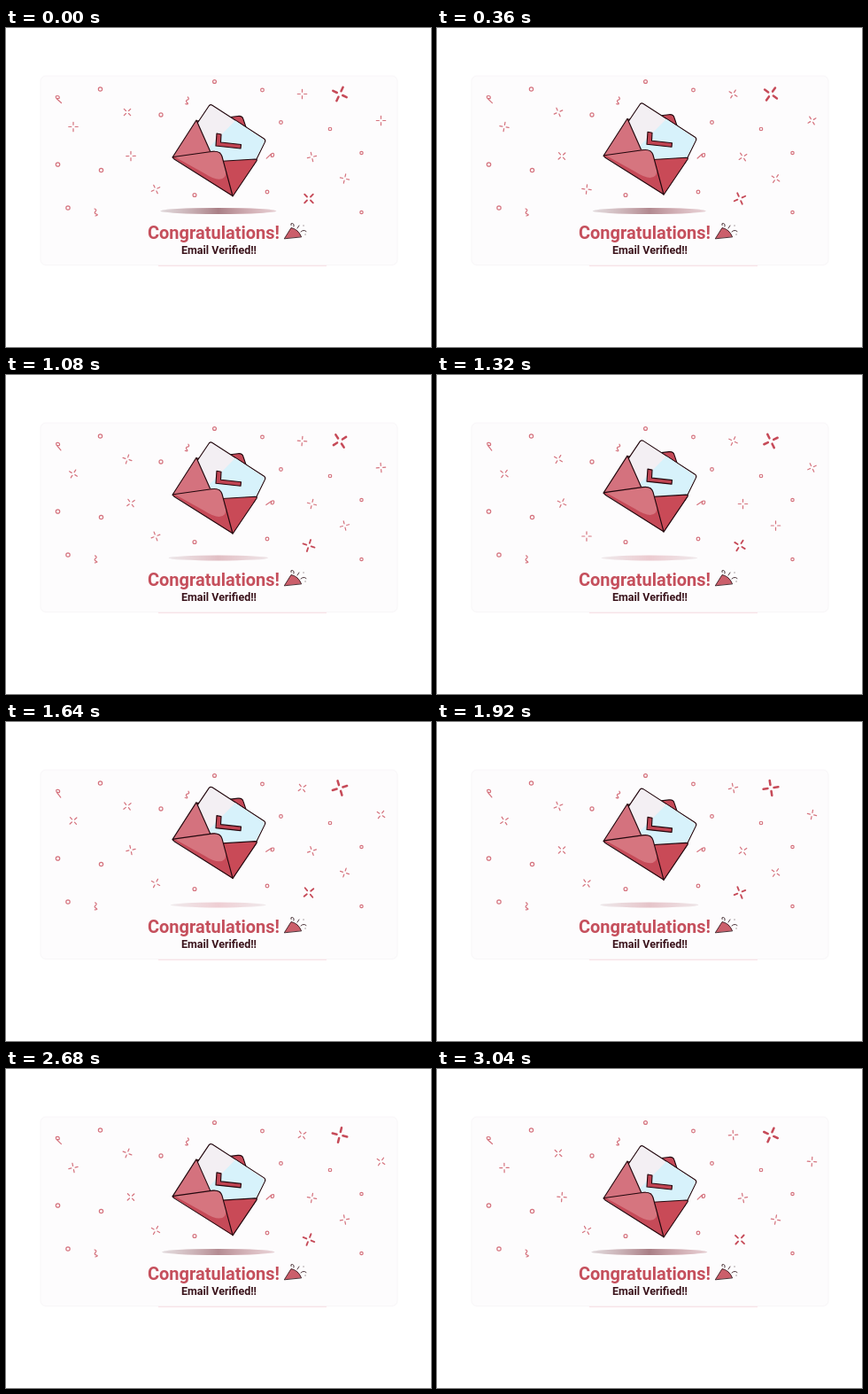
Write an HTML page that moves like this. It is 480 px wide and 360 px high and loops after 3080 ms.

```html
<!DOCTYPE html>
<html lang="en">
<head>
<meta charset="utf-8">
<title>Email verified</title>
<style>
  html, body { margin: 0; width: 100%; height: 100%; overflow: hidden; background: #fff; }
  svg { display: block; width: 480px; height: 360px; }
  text { font-family: Roboto, Arial, sans-serif; font-weight: 700; text-anchor: middle; }
  .ink { stroke: #23080e; stroke-width: 1.15; stroke-linejoin: round; stroke-linecap: round; }
  .thin { stroke-width: .8; }
  #confetti { fill: none; stroke: #d5737e; stroke-width: 1.2; stroke-linecap: round; }
</style>
</head>
<body>
<svg viewBox="0 0 480 360">
  <defs>
    <linearGradient id="shade">
      <stop offset="0" stop-color="#cfc5c8" stop-opacity=".5"/>
      <stop offset=".5" stop-color="#a97f86"/>
      <stop offset="1" stop-color="#dcb4ba" stop-opacity=".5"/>
    </linearGradient>
    <linearGradient id="blush">
      <stop offset="0" stop-color="#f0ebed"/>
      <stop offset=".5" stop-color="#f3d3d8"/>
      <stop offset="1" stop-color="#f0ebed"/>
    </linearGradient>
    <clipPath id="front"><path d="M188 146L232 139Q242 138 244 145L256 190Z"/></clipPath>
  </defs>
  <rect x="39" y="54" width="403" height="213.5" rx="6" fill="#fdfcfd" stroke="#f8f6f8"/>
  <path d="M172 268.3H362" stroke="#f7dde1"/>
  <g id="confetti"></g>
  <g id="shadow">
    <ellipse rx="65.5" ry="3.5" fill="url(#blush)"/>
    <ellipse id="dark" rx="65.5" ry="3.5" fill="url(#shade)"/>
  </g>

  <g id="mail">
    <path class="ink" fill="#c64a58" d="M215 105L262 99.5Q267 99 268 103L283 148L230 150Z"/>
    <path class="ink" fill="#f3eff3" d="M215 109L229.5 87.5Q231 86 233 87.2L291.500 125Q293.500 126.500 292.500 128.500L280 154L232 150Z"/>
    <path fill="#d7f2fb" d="M259 104.500L291 126Q292.500 127 291.800 128.500L281 150L233 148L227 137Z"/>
    <path class="ink" fill="#c04452" d="M238 119L243 120L242.5 129L265.5 131.5L265 136L237 133Z"/>
    <path class="ink" fill="#d4727e" d="M188 146L215 104L231 140L225 160Z"/>
    <path class="ink" fill="#c94a57" d="M240 150.5L281.500 148Q284 148 283 150L256 190Z"/>
    <g clip-path="url(#front)">
      <path fill="#c64a58" d="M180 130H262V195H180Z"/>
      <path fill="#d6757f" d="M180 130H246Q251 160 247 168Q241 175 224 164L188 144Z"/>
    </g>
    <path class="ink" fill="none" d="M189 145.500L232 139.500Q242 138 244 145L256 189.500L190 148Q187.500 146 189 145.500Z"/>
  </g>

  <text x="234.5" y="238" font-size="20" fill="#c54f5c">Congratulations!</text>
  <text x="240.5" y="255" font-size="12.5" fill="#3b141c">Email Verified!!</text>

  <path class="ink thin" fill="#cb5f6b" d="M314.500 237.500L322 225.500Q330 227 333.500 235.500Z"/>
  <path class="ink thin" fill="none" d="M322 222.500Q321 220 323.500 220.500T325 224M329 226L331 223M333 230Q336 227 339 229.500M336 223h.1M338 233h.1"/>
</svg>
<script>
const LOOP = 3080;
const $ = id => document.getElementById(id);
const set = (el, attrs) => {
  for (const key in attrs) el.setAttribute(key, attrs[key]);
};

function add(tag, attrs) {
  const el = document.createElementNS('http://www.w3.org/2000/svg', tag);
  set(el, attrs);
  return $('confetti').appendChild(el);
}

const pieces = [];

// Four rays that make `turns` quarter turns per loop and stand upright at phase `upright`
function star(x, y, turns, upright = 0, r = 5.2) {
  const el = add('path', {
    d: `M0 ${-r}V${-r * .42}M0 ${r}V${r * .42}M${-r} 0H${-r * .42}M${r} 0H${r * .42}`,
    'stroke-width': .4 * r - .85,
    stroke: r > 6 ? '#c64a58' : '#d5737e'
  });
  pieces.push({ el, x, y, angle: p => 90 * turns * (p - upright) });
}

function ribbon(x, y, d, tilt = 0) {
  pieces.push({ el: add('path', { d }), x, y, angle: p => tilt + 10 * rise(p) });
}

const rise = p => (1 - Math.cos(p * 2 * Math.PI)) / 2;

star(76, 111.5, 1);
star(334.5, 74.5, 3);
star(423.5, 104.5, -3);
star(141, 144.5, -4);
star(137, 95, 2, 1 / 4);
star(342, 192.5, 2, 1 / 4, 6.8);
star(382.5, 170, 2, 3 / 7);
star(345.5, 145.5, -2, 3 / 7);
star(169, 182, 3, 3 / 7);
star(377, 74.5, 1, .72, 8.5);

const HOOK = 'M3.500 4L-2 -1Q-4 -4 -1 -4T1 -1H-2';
const WAVE = 'M-1 -4Q2 -3 0 -1T1 2T0 4';
ribbon(59, 80.5, HOOK);
ribbon(298.5, 144, HOOK, 95);
ribbon(204.5, 82, WAVE, 25);
ribbon(101, 208, WAVE);

const rings = [
  [58.5, 154], [70, 203], [106.5, 69], [107.5, 160.5], [175, 98], [213, 188.5], [235.5, 60.5],
  [289.5, 70], [295, 185], [310.5, 106.5], [366, 114], [401.5, 141], [401.5, 208]
];
// Rings shrink towards the right
for (const [cx, cy] of rings) add('circle', { cx, cy, r: 2.3 - cx / 650 });

function draw(p) {
  const lift = rise(p);
  set($('mail'), { transform: `translate(0 ${-13.5 * lift})` });
  set($('shadow'), { transform: `translate(239.8 206.5) scale(${1 - .18 * lift})` });
  set($('dark'), { opacity: 1 - .95 * lift });
  for (const { el, x, y, angle } of pieces) {
    set(el, { transform: `translate(${x} ${y}) rotate(${angle(p)})` });
  }
}

const begin = performance.now();
function frame() {
  draw((performance.now() - begin) % LOOP / LOOP);
  requestAnimationFrame(frame);
}
frame();
</script>
</body>
</html>
```
